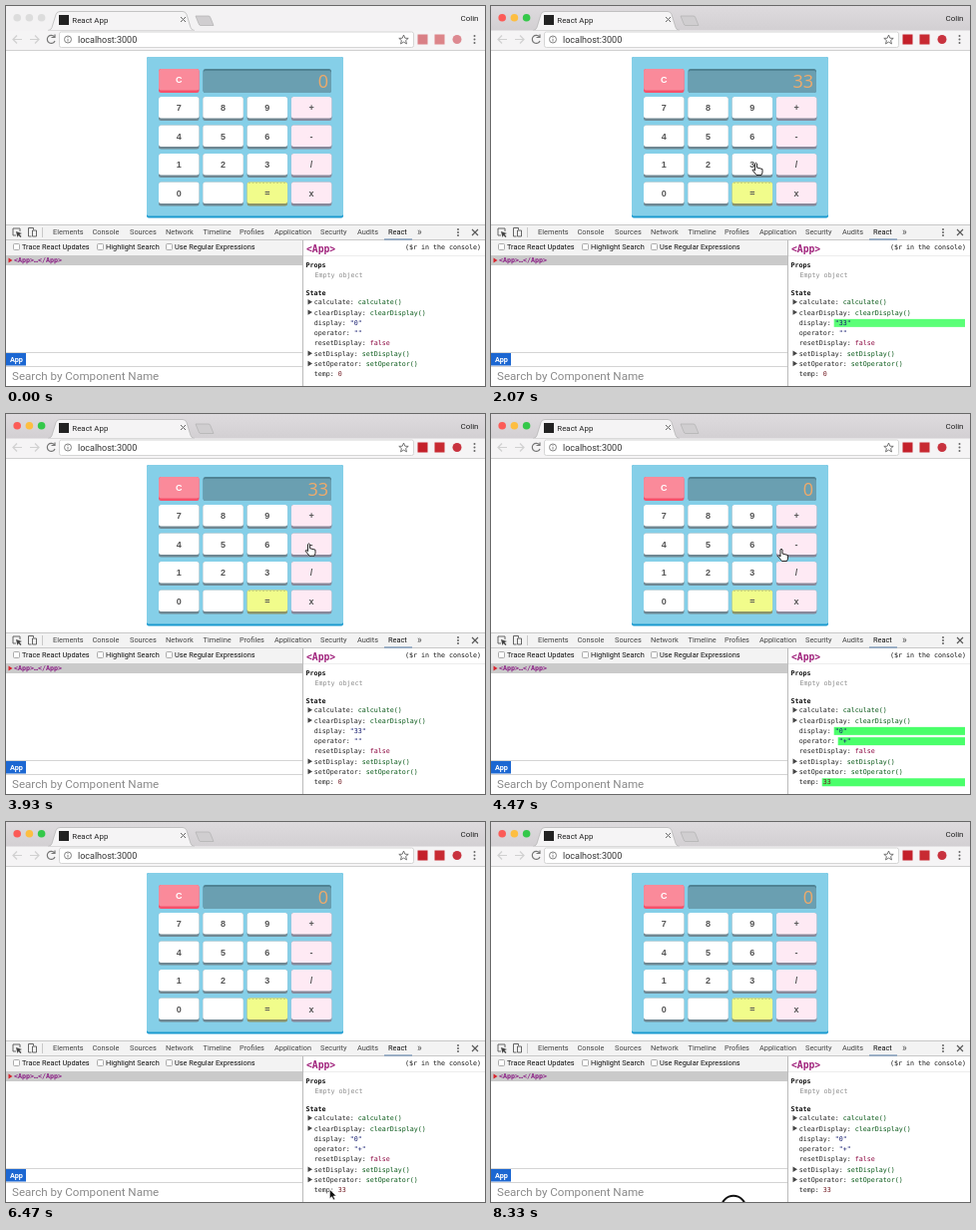
Recreate the animation shown at these times as an HTML page. Size 480 by 381 pixels, loop 8.39 s.

```html
<!DOCTYPE html>
<html lang="en">
<head>
<meta charset="utf-8">
<title>Calculator state demo</title>
<style>
html, body { margin: 0; width: 100%; height: 100%; overflow: hidden; background: #fff; }
svg { display: block; width: 480px; height: 381px; }
text { white-space: pre; font-family: Roboto, "Liberation Sans", sans-serif; }
.mono { font-family: "DejaVu Sans Mono", monospace; }
.key { font-family: "Liberation Sans", Arial, sans-serif; }
.screen { font-family: "Open Sans", "Noto Sans", sans-serif; }
</style>
</head>
<body>
<svg id="stage" viewBox="0 0 480 381">
  <defs>
    <linearGradient id="chrome" x2="0" y2="1">
      <stop stop-color="#dedbde"/><stop offset="1" stop-color="#d2cfd2"/>
    </linearGradient>
  </defs>
</svg>
<script>
const LOOP = 8390;
const stage = document.getElementById('stage');

function add(tag, attrs, content) {
  const el = document.createElementNS('http://www.w3.org/2000/svg', tag);
  for (const key in attrs) el.setAttribute(key, attrs[key]);
  if (content !== undefined) el.textContent = content;
  stage.append(el);
  return el;
}
const rect = (x, y, width, height, fill, more) => add('rect', { x, y, width, height, fill, ...more });
const dot = (cx, cy, r, fill, more) => add('circle', { cx, cy, r, fill, ...more });
const path = (d, fill, more) => add('path', { d, fill, ...more });
const line = (d, stroke, width = 1) => path(d, 'none', { stroke, 'stroke-width': width });
const text = (str, x, y, size, fill, more) => add('text', { x, y, 'font-size': size, fill, ...more }, str);
const mono = (str, x, y, fill, more) => text(str, x, y, 6.65, fill, { class: 'mono', ...more });
const BOLD = { 'font-weight': 'bold' };

// Parts that turn pale while the window is out of focus: element, attribute, focused, unfocused
const focusParts = [];
const onFocus = (el, attr, focused, unfocused) => focusParts.push([el, attr, focused, unfocused]);

function drawBrowser() {
  onFocus(rect(0, 0, 480, 25, 'url(#chrome)'), 'fill', 'url(#chrome)', '#f3f2f3');
  ['#fc5b57', '#fdbe41', '#34c84a'].forEach((c, i) =>
    onFocus(dot(11.2 + 12.2 * i, 11.8, 3.8, c), 'fill', c, '#dcdcdc'));
  path('M42 24.5q3 0 4-3l4-13q1-3 4-3h123q3 0 4 3l4 13q1 3 4 3z', '#f5f4f5', { stroke: '#b0b0b0', 'stroke-width': .7 });
  rect(53, 9, 10, 10, '#222');
  text('React App', 66.3, 16.5, 7.9, '#222');
  line('M175 11l5 5m0-5l-5 5', '#666');
  path('M190 10h13q1.500 0 2 2l3 7.500h-13q-1.500 0-2-2z', '#d0ced0', { stroke: '#b0b0b0', 'stroke-width': .7 });
  text('Colin', 473.5, 14.7, 8, '#222', { 'text-anchor': 'end' });

  rect(0, 24.5, 480, 20, '#f5f4f5');
  line('M16 33.5H7m4-4l-4 4 4 4M24 33.5h9m-4-4l4 4-4 4', '#d0d0d0', 1.2);
  line('M48.5 31a4 4 0 1 0 .5 4M49 28.5v3h-3.5', '#777', 1.2);
  rect(53.5, 26, 355, 15.5, '#fff', { rx: 2, stroke: '#ccc', 'stroke-width': .8 });
  dot(62, 33.5, 3.5, 'none', { stroke: '#777', 'stroke-width': .9 });
  line('M62 33v2.5m0-4.3v1', '#777', .9);
  text('localhost:3000', 72, 36.5, 9, '#333');
  path('M398.500 29l1.300 3.200 3.400.2-2.600 2.200.9 3.300-3-1.800-3 1.800.9-3.300-2.600-2.200 3.400-.2z', 'none',
    { stroke: '#666', 'stroke-width': .9 });
  [rect(412.5, 28.5, 10, 10, '#c4202a'), rect(429.5, 28.5, 10, 10, '#c82a32'), dot(452, 33.5, 4.5, '#c8323e')]
    .forEach(icon => onFocus(icon, 'opacity', 1, .55));
  for (const y of [30, 33.5, 37]) dot(469.5, y, 1, '#666');
  line('M0 44.500H480', '#d0d0d0');
}

function drawKey(label, x, y, face, edge, color = '#555') {
  rect(x, y, 40.5, 24, edge, { rx: 2.5 });
  rect(x, y, 40.5, 21.5, face, { rx: 2.5 });
  text(label, x + 20.2, y + 14, 9, color, { class: 'key', 'text-anchor': 'middle', ...BOLD });
}

function drawCalculator() {
  rect(141, 51, 197, 161.4, '#1d9bd0', { rx: 2 });
  rect(141, 51, 197, 159.4, '#85cfe8', { rx: 2 });
  drawKey('C', 153, 63, '#fa8a9a', '#f5516b', '#fff');
  rect(197.5, 63, 128.5, 24, '#4f8293', { rx: 2.5 });
  rect(197.5, 65, 128.5, 22, '#6a9fb1', { rx: 2.5 });
  ['789+', '456-', '123/', '0 =x'].forEach((row, r) => [...row].forEach((label, c) => {
    const [face, edge] = label === '=' ? ['#f1fc8b', '#8c9468'] : c === 3 ? ['#feeaf4', '#87889a'] : ['#fff', '#6f8792'];
    drawKey(label, 153 + 44.3 * c, 91 + 28.5 * r, face, edge);
  }));
  add('path', { d: 'M243 177.500h37', stroke: '#c4cc78', 'stroke-width': .8, 'stroke-dasharray': '2 1.500' });
}

function drawDevTools() {
  rect(0, 219, 480, 31, '#f3f3f3');
  line('M0 219.500H480M0 234.500H480M36.500 222v10', '#c8c8c8');
  line('M14 226v-3H7v7h3', '#555', .9);
  path('M10 226l6 2-2.500 1 2 2-1 1-2-2-1 2z', '#444');
  line('M22.500 226v-3.500h5v2M22.500 226v5h3M26.500 225h4v6h-4z', '#555', .9);
  [['Elements', 47], ['Console', 86.5], ['Sources', 124], ['Network', 160], ['Timeline', 197.5], ['Profiles', 234],
    ['Application', 269], ['Security', 315], ['Audits', 352], ['React', 383]]
    .forEach(([name, x]) => text(name, x, 229.2, 7.4, name === 'React' ? '#111' : '#444'));
  text('»', 412, 230, 10, '#555');
  line('M379 234H407', '#6f8fb5', 1.2);
  for (const y of [224, 227, 230]) dot(453, y, .9, '#555');
  line('M467 224l6 6m0-6l-6 6', '#555', 1.1);

  [['Trace React Updates', 7], ['Highlight Search', 91], ['Use Regular Expressions', 160]].forEach(([label, x]) => {
    rect(x + .5, 238.5, 6, 6, '#fff', { rx: 1, stroke: '#999', 'stroke-width': .8 });
    text(label, x + 9, 244.2, 7.35, '#111');
  });
  rect(0, 250, 297, 131, '#fff');
  rect(0, 250, 297, 10, '#cacaca');
  path('M2.500 252.500l4 2.500-4 2.500z', '#d8232c');
  mono('<App>…</App>', 8, 257.3, '#8a1a84', BOLD);
  line('M0 347.500H297M0 361.500H297', '#d4d4d4');
  rect(0, 348, 20, 12.5, '#1c67d2');
  text('App', 4, 357, 7.3, '#fff', BOLD);
  text('Search by Component Name', 6, 374.6, 11.6, '#8a8a8a');

  rect(297, 235, 183, 146, '#fff');
  line('M297.500 235V381', '#bbb');
  line('M298 250.500H480', '#ececec');
  text('<App>', 301, 247, 9.7, '#a0227c', { class: 'mono', ...BOLD });
  mono('($r in the console)', 400, 243.8, '#111');
  mono('Props', 300.5, 262, '#111', BOLD);
  mono('Empty object', 309.5, 271.6, '#8c8c8c');
  mono('State', 300.5, 290.2, '#111', BOLD);
}

const fields = {};
function drawState() {
  const GREEN = '#085818', NAVY = '#10186c';
  [['calculate', 'calculate()', GREEN], ['clearDisplay', 'clearDisplay()', GREEN], ['display', '"0"', NAVY],
    ['operator', '""', NAVY], ['resetDisplay', 'false', '#8c0840'], ['setDisplay', 'setDisplay()', GREEN],
    ['setOperator', 'setOperator()', GREEN], ['temp', '0', '#701820']].forEach(([key, value, color], i) => {
    const y = 299.3 + 10.28 * i, x = 308.7 + 4 * (key.length + 2);
    if (color === GREEN) path(`M302.500 ${y - 5.2}l4.500 2.700-4.500 2.700z`, '#444');
    const flash = rect(x - 1, y - 6, 476 - x, 8, '#48ff68', { opacity: 0 });
    mono(key + ':', 308.7, y, '#222');
    fields[key] = { flash, value: mono(value, x, y, color) };
  });
}

drawBrowser();
drawCalculator();
drawDevTools();
drawState();
const screen = text('0', 323, 82.3, 18, '#eeaa6b', { class: 'screen', 'text-anchor': 'end' });
const ring = dot(0, 0, 12.2, 'none', { stroke: '#111', 'stroke-width': 2 });
const arrow = path('M0 0v9.500l2.200-2 1.500 3.300 1.700-.8-1.500-3.200h3z', '#111', { stroke: '#fff', 'stroke-width': .7 });
const hand = path('M-1 0.500q1-1.500 2 0v4l5.500 1.500v3.500l-1 2.500h-5l-4-5q1-1.500 2.500.5z', '#fff', { stroke: '#111', 'stroke-width': .9 });

// Pointer stops: time, x, y
const stops = [
  [350, 250, 400], [1250, 265.5, 157.5], [2150, 265.5, 157.5], [2750, 321.7, 314.5], [3500, 321.7, 314.5],
  [4050, 301, 105], [4380, 301, 105], [4470, 291, 135.5], [5050, 321.5, 315.5], [6150, 321.5, 315.5],
  [6700, 326, 400], [8000, 225, 402], [8250, 243, 387], [LOOP, 243, 387]
];
const presses = [[1440, 1560], [1790, 1910], [4290, 4400], [5520, 5700], [8270, LOOP]];
const hovers = [[1340, 2230], [3820, 4560]];
const changes = { display: [1520, 1870, 4400], operator: [4400], temp: [4400] };
const FOCUS_AT = 600;

const smooth = p => p * p * (3 - 2 * p);
const within = (spans, t) => spans.some(([from, to]) => t >= from && t < to);
const show = (el, on) => el.setAttribute('visibility', on ? 'visible' : 'hidden');

function pointerAt(t) {
  const i = stops.findIndex(stop => stop[0] > t);
  if (i < 1) return [0, 420];
  const [t0, x0, y0] = stops[i - 1], [t1, x1, y1] = stops[i];
  const p = smooth((t - t0) / (t1 - t0));
  return [x0 + (x1 - x0) * p, y0 + (y1 - y0) * p];
}

function render(t) {
  for (const [el, attr, focused, unfocused] of focusParts) el.setAttribute(attr, t < FOCUS_AT ? unfocused : focused);

  const added = t >= 4400;
  const shown = t < 1520 || added ? '0' : t < 1870 ? '3' : '33';
  screen.textContent = shown;
  fields.display.value.textContent = `"${shown}"`;
  fields.operator.value.textContent = added ? '"+"' : '""';
  fields.temp.value.textContent = added ? '33' : '0';
  for (const key in changes) {
    const last = changes[key].filter(time => time <= t).pop();
    const age = last === undefined ? 1 : Math.min(1, (t - last) / 1000);
    fields[key].flash.setAttribute('opacity', 1 - smooth(age));
  }

  const [x, y] = pointerAt(t), hovering = within(hovers, t);
  for (const el of [ring, arrow, hand]) el.setAttribute('transform', `translate(${x} ${y})`);
  show(ring, within(presses, t));
  show(arrow, !hovering);
  show(hand, hovering);
}

function tick() {
  render(performance.now() % LOOP);
  requestAnimationFrame(tick);
}
tick();
</script>
</body>
</html>
```
